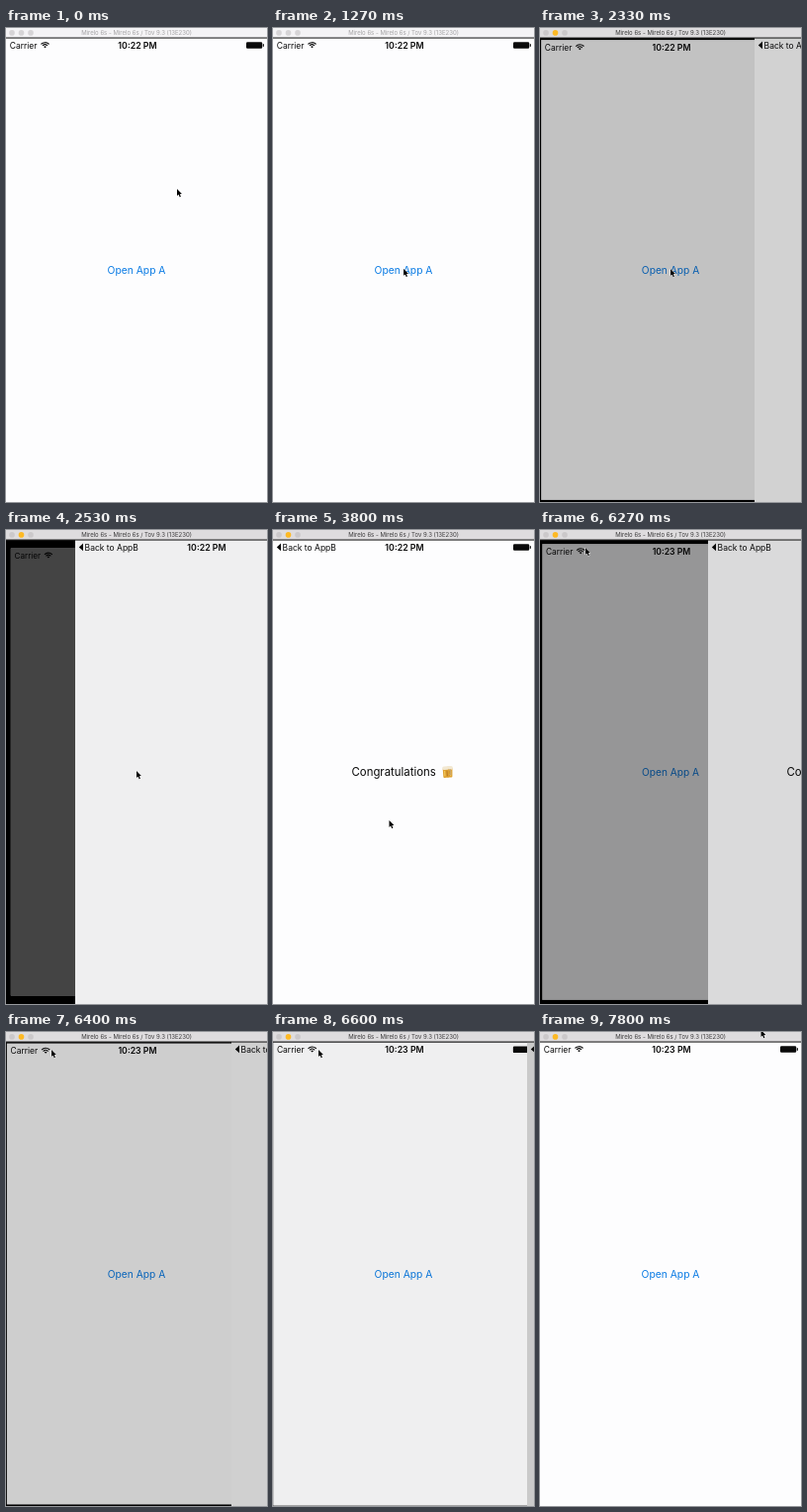
These frames come from a looping animation (264x480 px, 7.87 s). An HTML page with a canvas:

```html
<!DOCTYPE html>
<html lang="en">
<head>
<meta charset="utf-8">
<title>App switching</title>
<style>
  html, body { margin: 0; width: 100%; height: 100%; overflow: hidden; background: #fdfdfe; }
  canvas { display: block; width: 264px; height: 480px; }
</style>
</head>
<body>
<canvas id="stage" width="264" height="480"></canvas>
<script>
const ctx = document.getElementById('stage').getContext('2d');
const W = 264, H = 480, BAR = 10;
const LOOP = 7870, STEP = 1000 / 15;
const PAPER = '#fdfdfe';

const ACTIVATE = 1930, MINUTE = 5460;
const OPEN = { start: 2250, end: 2990, rate: 9.2 };
const BACK = { start: 6040, end: 6725, rate: 9.7 };

// time, x, y of the pointer tip
const POINTER = [
  [0, 173, 163], [70, 173, 163], [500, 163, 193], [870, 142, 223], [1270, 132, 244],
  [3270, 132, 244], [3560, 127, 277], [3800, 117.5, 294], [3930, 93, 294],
  [4270, 93, 294], [4500, 52, 225], [4800, 18, 105], [5070, 36, 33],
  [5400, 53, 9], [5800, 46, 17], [6200, 46, 18], [6800, 46, 18],
  [7400, 56, 146], [7540, 56, 146], [7800, 223.5, -2]
];

function pointerAt(t) {
  const i = POINTER.findIndex(p => p[0] > t);
  if (i < 0) return POINTER[POINTER.length - 1].slice(1);
  const a = POINTER[i - 1], b = POINTER[i];
  const k = (t - a[0]) / (b[0] - a[0]);
  return [a[1] + (b[1] - a[1]) * k, a[2] + (b[2] - a[2]) * k];
}

// Critically damped spring, snapped to rest at the end
function spring(t, { start, end, rate }) {
  if (t <= start) return 0;
  if (t >= end) return 1;
  const u = (t - start) / 1000 * rate;
  return 1 - (1 + u) * Math.exp(-u);
}

function rect(x, y, w, h, color) {
  ctx.fillStyle = color;
  ctx.fillRect(x, y, w, h);
}

function text(str, x, y, size, { color = '#0a0a0a', weight = 400, align = 'left' } = {}) {
  ctx.font = `${weight} ${size}px Inter, Roboto, sans-serif`;
  ctx.textAlign = align;
  ctx.fillStyle = color;
  ctx.fillText(str, x, y);
}

function polygon(points) {
  ctx.beginPath();
  points.forEach(([x, y]) => ctx.lineTo(x, y));
  ctx.closePath();
}

function rounded(x, y, w, h, r, color) {
  ctx.beginPath();
  ctx.roundRect(x, y, w, h, r);
  ctx.fillStyle = color;
  ctx.fill();
}

function wifi(x, y) {
  ctx.strokeStyle = '#0a0a0a';
  ctx.lineWidth = 1.15;
  for (const r of [3.4, 5.6]) {
    ctx.beginPath();
    ctx.arc(x, y, r, -Math.PI * 0.76, -Math.PI * 0.24);
    ctx.stroke();
  }
  ctx.beginPath();
  ctx.moveTo(x, y);
  ctx.arc(x, y, 1.9, -Math.PI * 0.76, -Math.PI * 0.24);
  ctx.fillStyle = '#0a0a0a';
  ctx.fill();
}

function statusRight(clock) {
  text(clock, 133, 20.6, 8.8, { weight: 600, align: 'center' });
  rounded(243, 14.2, 16.2, 6.6, 1.2, '#0a0a0a');
  rounded(259.7, 16.1, 1.2, 2.8, 0.6, '#0a0a0a');
}

function mug(x, y, w) {
  ctx.strokeStyle = '#c9a56a';
  ctx.lineWidth = 1.2;
  ctx.strokeRect(x + w - 0.5, y + 4, 2.2, 4.5);
  rounded(x, y + 1.5, w, 10, 1, '#dda02f');
  rect(x + 1.2, y + 4.5, 1, 5.5, '#f4cb62');
  rect(x + w - 2.4, y + 4.5, 1, 5.5, '#b97824');
  rounded(x - 0.4, y, w + 0.8, 3.6, 1.6, '#f2e8d2');
}

function beers() {
  ctx.save();
  ctx.translate(183, 238.5);
  ctx.scale(-1, 1);
  mug(1.6, 0.6, 5.6);
  ctx.restore();
  ctx.save();
  ctx.translate(169.5, 239.5);
  ctx.rotate(-0.08);
  mug(2, 0.2, 6);
  ctx.restore();
}

function homeScreen(clock) {
  rect(0, BAR, W, H - BAR, PAPER);
  text('Carrier', 3.7, 20.6, 8.5);
  wifi(39.5, 20.3);
  statusRight(clock);
  text('Open App A', 132, 249, 10.3, { color: '#0a7be4', align: 'center' });
}

function resultScreen(clock, reveal) {
  rect(0, BAR, W, H - BAR, PAPER);
  polygon([[3.8, 17.4], [8, 13.6], [8, 21.2]]);
  ctx.fillStyle = '#0a0a0a';
  ctx.fill();
  text('Back to AppB', 9.6, 20.6, 8.5);
  statusRight(clock);
  ctx.globalAlpha = reveal;
  text('Congratulations', 79.5, 249, 11.4);
  if (reveal > 0) beers();
  ctx.globalAlpha = 1;
}

// cover: 0 shows the home screen, 1 the result screen
function screens(cover, clock, reveal) {
  if (cover === 0) return homeScreen(clock);
  if (cover === 1) return resultScreen(clock, reveal);

  rect(0, BAR, W, H - BAR, '#000');
  const scale = 1 - 0.05 * cover, cy = (H + BAR) / 2;
  ctx.save();
  ctx.translate(W / 2, cy);
  ctx.scale(scale, scale);
  ctx.translate(-W / 2, -cy);
  homeScreen(clock);
  rect(0, BAR, W, H - BAR, `rgba(0,0,0,${0.933 * cover ** 0.8})`);
  ctx.restore();

  const away = 1 - cover;
  ctx.save();
  ctx.translate(Math.round(W * away), 0);
  resultScreen(clock, reveal);
  rect(0, BAR, W, H - BAR, `rgba(0,0,0,${0.21 * away})`);
  ctx.restore();
}

function titleBar(active) {
  rect(0, 0, W, BAR, active ? '#dedcde' : '#f4f3f5');
  const dots = active ? ['#cbc8ca', '#fdb924', '#cbc8ca'] : ['#d6d4d6', '#d6d4d6', '#d6d4d6'];
  dots.forEach((color, i) => {
    ctx.beginPath();
    ctx.arc(6 + i * 9.5, 4.9, 2.8, 0, Math.PI * 2);
    ctx.fillStyle = color;
    ctx.fill();
  });
  text('Mirelo 6s - Mirelo 6s / Tov 9.3 (13E230)', 132, 7.2, 6,
    { color: active ? '#3c3b3c' : '#a5a4a6', align: 'center' });
  rect(0, 9.5, W, 1.1, '#222');
}

function pointer([x, y]) {
  ctx.save();
  ctx.translate(x, y);
  polygon([[0, 0], [0, 7], [1.6, 5.6], [2.7, 8.2], [3.9, 7.7], [2.8, 5.2], [4.9, 5.1]]);
  ctx.lineJoin = 'round';
  ctx.lineWidth = 1;
  ctx.strokeStyle = '#fff';
  ctx.stroke();
  ctx.fillStyle = '#000';
  ctx.fill();
  ctx.restore();
}

function draw(now) {
  const t = Math.floor((now % LOOP + 4) / STEP) * STEP;
  const cover = t < BACK.start ? spring(t, OPEN) : 1 - spring(t, BACK);
  const reveal = Math.min(1, Math.max(0, (t - 2950) / 180));
  screens(cover, t < MINUTE ? '10:22 PM' : '10:23 PM', reveal);
  titleBar(t >= ACTIVATE);
  pointer(pointerAt(t));
}

const begin = performance.now();
function tick() {
  draw(performance.now() - begin);
  requestAnimationFrame(tick);
}
tick();
</script>
</body>
</html>
```
